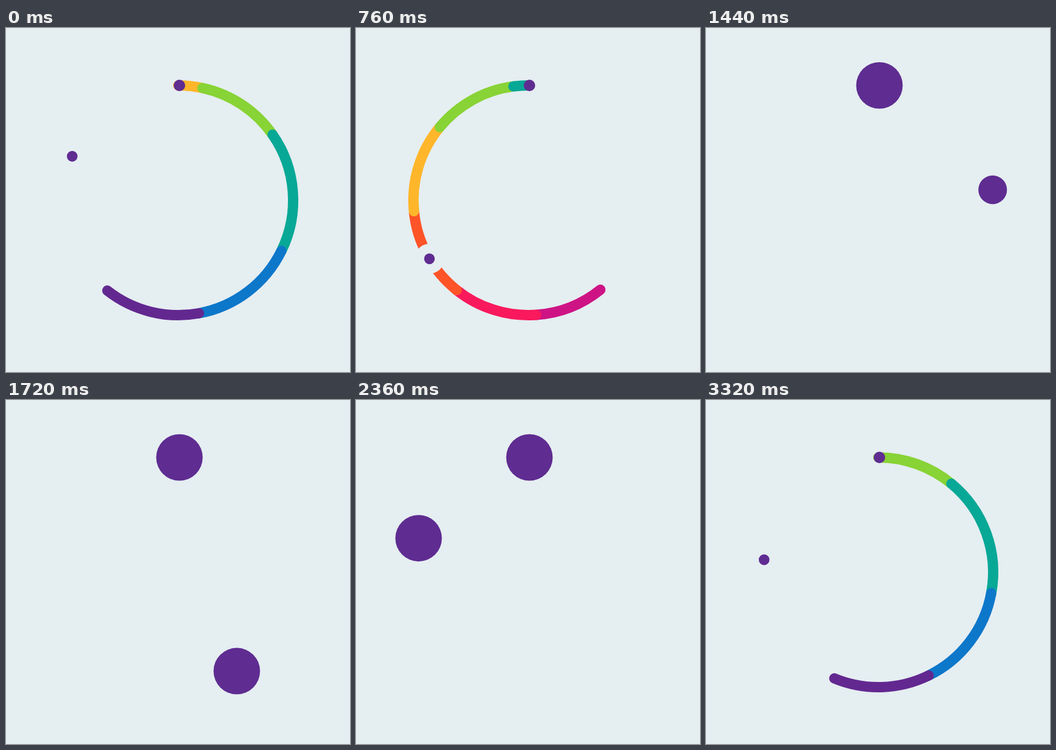
Recreate the animation shown at these times as an HTML page with a canvas. Size 599x599 px, loop 3360 ms.

```html
<!DOCTYPE html>
<html>
<head>
<meta charset="utf-8">
<style>
  html, body { margin: 0; width: 100%; height: 100%; overflow: hidden; background: #e5eef1; }
  canvas { display: block; }
</style>
</head>
<body>
<canvas id="stage" width="599" height="599"></canvas>
<script>
const ctx = document.getElementById('stage').getContext('2d');
const LOOP = 3360, STEP = 40, LAUNCH = 2800;
const BG = '#e5eef1', PURPLE = '#5f2c91';
const CENTER = 300, ORBIT = 200;
const SMALL = 9.3, REST = 10, BIG = 40.5;

// Snake colours from head to tail, and the degrees behind the head where each begins
const COLORS = ['#632890', '#0d77ca', '#08a896', '#88d335', '#ffb62a', '#ff5328', '#f9195c', '#ce1485'];
const CUTS = [0, 48.5, 102, 163, 206, 251, 297, 339.5, 374.4];
const SNAKE_SPEED = 360 / 920;

const clamp = (x, lo = 0, hi = 1) => Math.min(hi, Math.max(lo, x));
const ramp = (t, start, length) => clamp((t - start) / length);
const smooth = p => p * p * (3 - 2 * p);
const radians = deg => (deg - 90) * Math.PI / 180;

function disc(x, y, r, color) {
  ctx.fillStyle = color;
  ctx.beginPath();
  ctx.arc(x, y, r, 0, 2 * Math.PI);
  ctx.fill();
}

// Fast launch settling to a steady pace for two turns, then one slow turn
function dotAngle(t) {
  if (t < 1620) return 0.4034 * t + 66.9 * (1 - Math.exp(-t / 101));
  const u = (t - 1620) / (LOOP - 1620);
  return 720 + 360 * (u + u * (1 - u) * (0.03 + 0.32 * u));
}

function drawSnake(t) {
  const head = SNAKE_SPEED * (t - 2.5);
  ctx.lineWidth = 18;
  ctx.lineCap = 'round';
  for (let i = COLORS.length - 1; i >= 0; i--) {
    const from = clamp(head - CUTS[i + 1], 0, 360);
    const to = clamp(head - CUTS[i], 0, 360);
    if (to <= from) continue;
    ctx.strokeStyle = COLORS[i];
    ctx.beginPath();
    ctx.arc(CENTER, CENTER, ORBIT, radians(from), radians(to));
    ctx.stroke();
  }
}

function draw(time) {
  // t counts from the launch of the dot
  const t = (time + LOOP - LAUNCH) % LOOP;
  ctx.fillStyle = BG;
  ctx.fillRect(0, 0, 599, 599);
  drawSnake(t);

  const a = radians(dotAngle(t));
  const x = CENTER + ORBIT * Math.cos(a), y = CENTER + ORBIT * Math.sin(a);
  const dotSize = 1 - ramp(t, 0, 120) + ramp(t, 1880, 240);
  disc(x, y, 26, BG);
  disc(x, y, SMALL + (BIG - SMALL) * dotSize, PURPLE);

  const anchorSize = 1 - smooth(ramp(t, 0, 350)) + smooth(ramp(t, 1610, 350));
  disc(302, 100, REST + (BIG - REST) * anchorSize, PURPLE);
}

const begin = performance.now();
function tick() {
  const time = (performance.now() - begin) % LOOP;
  draw(Math.floor(time / STEP) * STEP);
  requestAnimationFrame(tick);
}
tick();
</script>
</body>
</html>
```
